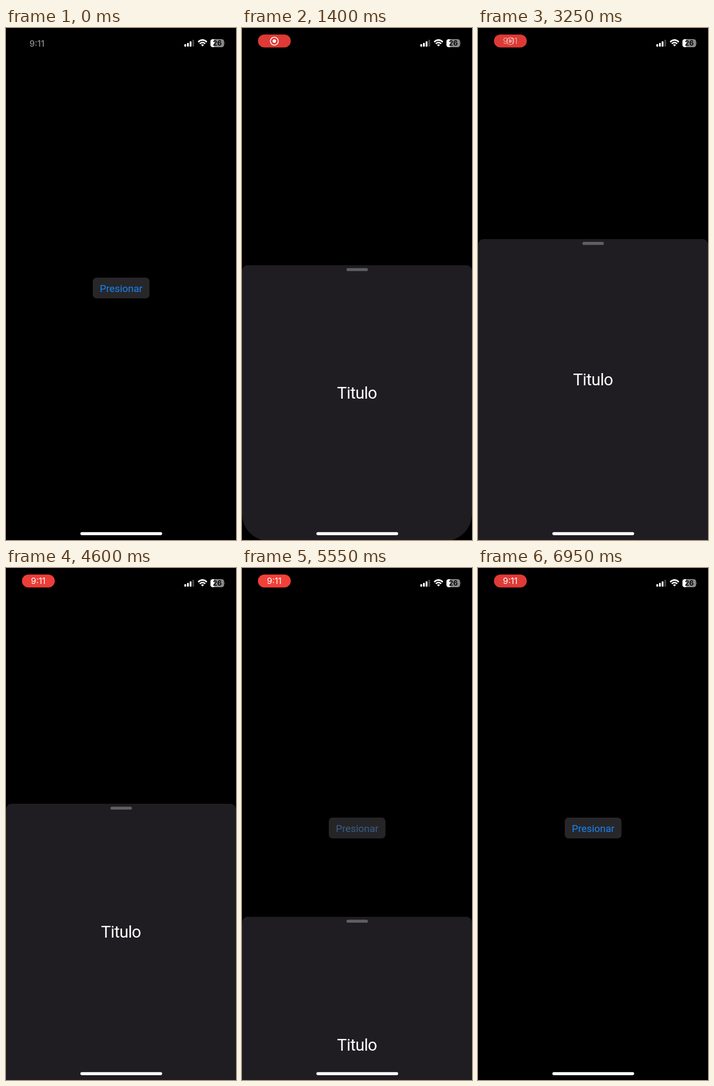
Animation of 432 by 960 pixels, one loop 7 s. Source, as an HTML page:

```html
<!DOCTYPE html>
<html lang="es">
<head>
<meta charset="utf-8">
<title>Bottom sheet</title>
<style>
  html, body { margin: 0; width: 100%; height: 100%; overflow: hidden; background: #000; }
  svg { display: block; width: 432px; height: 960px; }
  text { text-anchor: middle; }
  .label { font-family: Roboto, "Liberation Sans", sans-serif; }
  .status { font-family: Inter, "Liberation Sans", sans-serif; font-size: 16px; font-weight: 500; }
  #pillTime { font-weight: 400; }
</style>
</head>
<body>
<svg viewBox="0 0 432 960">
  <rect width="432" height="960" fill="#000"/>

  <text id="clock" class="status" x="58" y="34.5" fill="#8c8c8c">9:11</text>
  <g id="pill">
    <rect id="pillBody" x="30" y="12.3" width="61.6" height="24.2" rx="12.1"/>
    <g id="rec">
      <circle cx="60.7" cy="24.6" r="7.4" fill="none" stroke="#fff" stroke-width="1.6"/>
      <circle cx="60.7" cy="24.6" r="3.3" fill="#fff"/>
    </g>
    <text id="pillTime" class="status" x="60.5" y="30.4" fill="#fff">9:11</text>
  </g>

  <g fill="#fff">
    <rect x="335" y="30.3" width="3.4" height="4.7" rx="1"/>
    <rect x="340" y="28" width="3.4" height="7" rx="1"/>
    <rect x="345" y="25" width="3.4" height="10" rx="1"/>
    <rect x="350" y="22" width="3.4" height="13" rx="1" fill="#444"/>
  </g>
  <g fill="none" stroke="#fff" stroke-width="2.7">
    <path d="M361 26.2Q369 18.8 377.2 26.2"/>
    <path d="M364 29.5Q369 24.9 374.2 29.5"/>
    <path d="M366.3 31.7Q369 29.5 371.9 31.7L369.1 34.6Z" fill="#fff" stroke="none"/>
  </g>
  <clipPath id="cell"><rect x="384" y="21" width="25.6" height="15" rx="4.6"/></clipPath>
  <g clip-path="url(#cell)">
    <rect x="384" y="21" width="26" height="15" fill="#8b8b8d"/>
    <rect x="384" y="21" width="6.8" height="15" fill="#fff"/>
  </g>
  <path d="M410.6 26.3Q412.4 28.5 410.6 30.7Z" fill="#8b8b8d"/>
  <text class="status" x="396.9" y="33.2" fill="#050505" style="font-size:13px;font-weight:700">26</text>

  <rect id="button" x="163" y="468" width="106.5" height="39" rx="7"/>
  <text id="buttonText" class="label" x="216.3" y="495" font-size="18.8">Presionar</text>

  <g id="sheet">
    <path id="panel" fill="#1f1d21"/>
    <rect x="196.2" y="5.4" width="40.3" height="5.6" rx="2.8" fill="#5f5e63"/>
    <text id="title" class="label" x="216" font-size="31" letter-spacing="-0.6" fill="#fff">Titulo</text>
  </g>

  <rect x="139.7" y="945.3" width="153.6" height="5.6" rx="2.8" fill="#fff"/>
</svg>
<script>
const LOOP = 7000, STEP = 50;
const HEIGHT = 960, REST = 442.5, SAFE = 37;
const OPEN_AT = 850, OPEN_END = 1650, SPRING = 13.8;

// Finger drags and the closing throw: [time, top edge]
const DRAG = [
  [1650, 442.5], [1850, 468], [2150, 555], [2400, 596], [2600, 590],
  [2850, 520], [3050, 438], [3250, 395.7], [3550, 378], [3900, 372],
  [4100, 382], [4250, 415], [4400, 437], [4600, 442], [4850, 443],
  [5100, 500], [5350, 572], [5450, 606], [5550, 654], [5650, 740],
  [5750, 825], [5850, 888], [6000, 940], [6150, 958], [6250, 975]
];

const el = id => document.getElementById(id);
const clamp = v => Math.max(0, Math.min(1, v));
const ramp = (t, from, to) => clamp((t - from) / (to - from));
const mix = (a, b, k) => `rgb(${a.map((v, i) => Math.round(v + (b[i] - v) * k))})`;

const secant = i => (DRAG[i + 1][1] - DRAG[i][1]) / (DRAG[i + 1][0] - DRAG[i][0]);

// Monotone slope, flat at turning points
function slope(i) {
  if (i === 0 || i === DRAG.length - 1) return 0;
  const a = secant(i - 1), b = secant(i);
  return a * b > 0 ? 2 * a * b / (a + b) : 0;
}

function dragTop(t) {
  const next = DRAG.findIndex(k => k[0] > t);
  if (next < 0) return DRAG[DRAG.length - 1][1];
  const i = next - 1, [t0, y0] = DRAG[i], [t1, y1] = DRAG[next];
  const d = t1 - t0, u = (t - t0) / d, v = 1 - u;
  return y0 * (1 + 2 * u) * v * v + y1 * u * u * (3 - 2 * u)
    + d * (slope(i) * u * v * v - slope(next) * u * u * v);
}

function sheetTop(t) {
  if (t >= OPEN_END) return dragTop(t);
  const s = Math.max(0, t - OPEN_AT) / 1000 * SPRING;
  return REST + (HEIGHT - REST) * (1 + s) * Math.exp(-s);
}

function panelPath(bottom, r) {
  const y = bottom - r;
  return `M0 ${y}V11A11 11 0 0 1 11 0H421A11 11 0 0 1 432 11V${y}`
    + `A${r} ${r} 0 0 1 ${432 - r} ${bottom}H${r}A${r} ${r} 0 0 1 0 ${y}Z`;
}

function drawStatus(t) {
  el("clock").style.opacity = 1 - ramp(t, 50, 200);
  el("pill").style.opacity = ramp(t, 50, 350);
  const glow = 0.5 + 0.5 * Math.cos((t - 2400) / 1750 * 2 * Math.PI);
  el("pillBody").setAttribute("fill", mix([221, 58, 53], [255, 67, 59], glow));
  const swap = ramp(t, 3130, 3370);
  el("rec").style.opacity = 1 - swap;
  el("rec").setAttribute("transform",
    `translate(60.7 24.6) scale(${1 - 0.2 * swap}) translate(-60.7 -24.6)`);
  el("pillTime").style.opacity = swap;
}

function drawButton(t) {
  const dim = ramp(t, 780, 1050) * (1 - ramp(t, 5430, 5800));
  const shade = ramp(t, 850, 1200) * (1 - ramp(t, 5400, 5600));
  el("button").setAttribute("fill", mix([39, 39, 42], [30, 30, 33], shade));
  el("buttonText").setAttribute("fill", mix([24, 132, 245], [76, 76, 80], dim));
}

function drawSheet(t) {
  const top = sheetTop(t);
  const opening = t < 1600;
  const centre = (HEIGHT - SAFE - Math.min(top, REST)) / 2;
  el("sheet").style.display = top < HEIGHT ? "" : "none";
  el("sheet").setAttribute("transform", `translate(0 ${top.toFixed(2)})`);
  el("panel").setAttribute("d", opening ? panelPath(HEIGHT - REST, 52) : panelPath(700, 1));
  el("title").setAttribute("y", (centre + 10.4).toFixed(2));
}

function frame(now) {
  let t = Math.floor(now % LOOP / STEP) * STEP;
  if (t < 100) t = 0;
  drawStatus(t);
  drawButton(t);
  drawSheet(t);
}

const start = performance.now();
function tick() {
  frame(performance.now() - start);
  requestAnimationFrame(tick);
}
tick();
</script>
</body>
</html>
```
